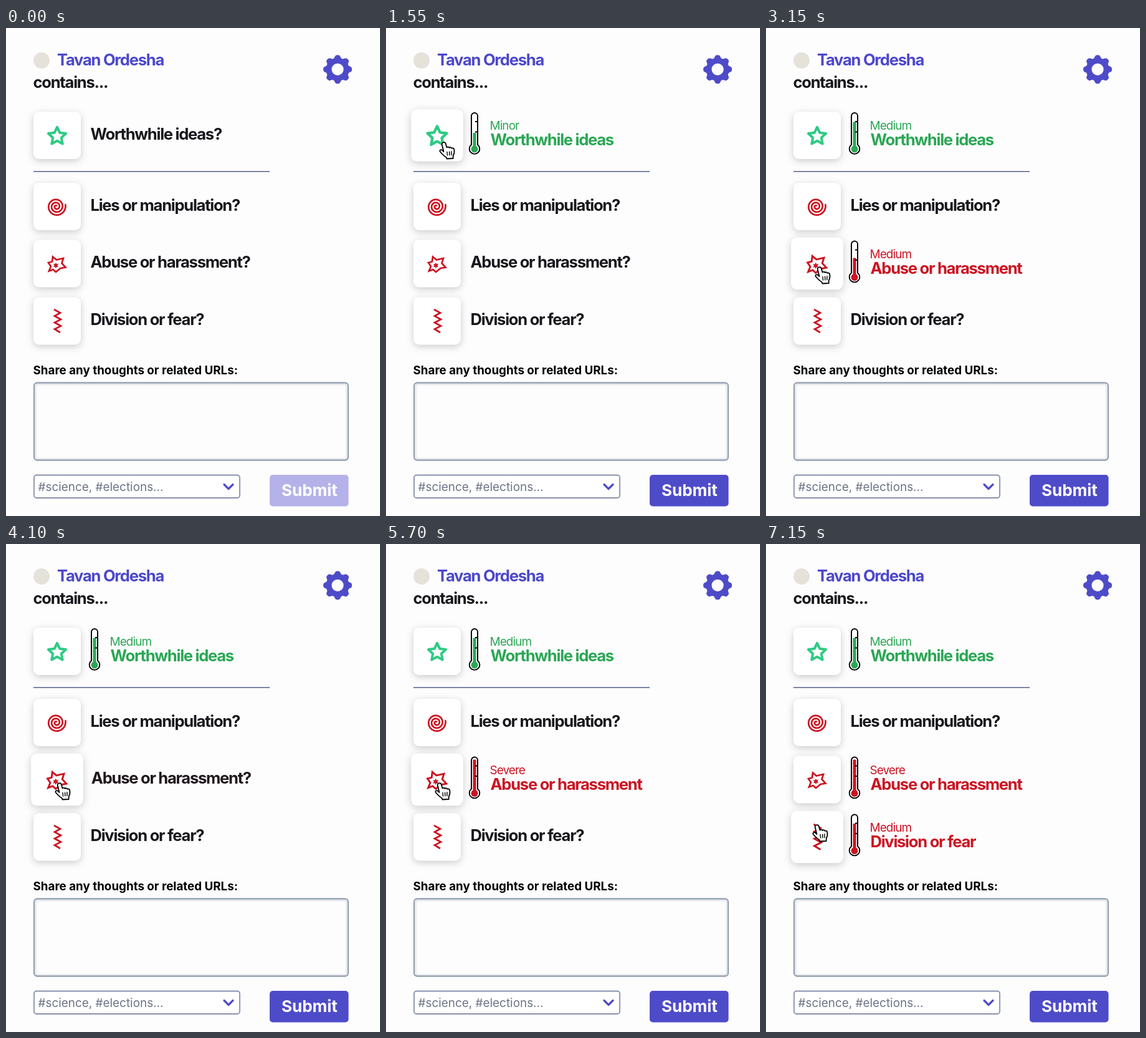
Write an HTML page that moves like this. It is 600 px wide and 782 px high and loops after 7.2 s.

```html
<!DOCTYPE html>
<html lang="en">
<head>
<meta charset="utf-8">
<title>Rating form</title>
<style>
  html, body { margin: 0; width: 100%; height: 100%; overflow: hidden; background: #fefdfe; }
  svg { display: block; width: 100%; height: 100%; }
  text { font-family: Inter, sans-serif; white-space: pre; }
  .big { font-size: 25.6px; font-weight: 700; letter-spacing: -.05em; }
  .sub { font-size: 19px; letter-spacing: -.05em; }
  .card { fill: #fff; filter: drop-shadow(0 3px 6px rgba(0, 0, 0, .2)); }
  .line { fill: none; stroke-width: 2.7; }
</style>
</head>
<body>
<svg id="stage" viewBox="0 0 600 782">
  <defs>
    <filter id="soft"><feGaussianBlur stdDeviation="1.6"/></filter>
  </defs>
  <circle cx="57" cy="52" r="13" fill="#e5e2da"/>
  <text class="big" x="82" y="60" fill="#4c48cb">Tavan Ordesha</text>
  <text class="big" x="43.5" y="96" fill="#17181c">contains...</text>
  <path id="gear" fill="#4e4bc9" fill-rule="evenodd"/>
  <path d="M44 230H423" stroke="#7d86a8" stroke-width="1.8"/>
  <g id="rows"></g>

  <text x="43.5" y="554.5" font-size="18.8" font-weight="700">Share any thoughts or related URLs:</text>
  <rect x="46.5" y="570" width="501" height="121.5" rx="4" fill="none" stroke="#cfd4dc" stroke-width="2.5" filter="url(#soft)"/>
  <rect x="45" y="568.5" width="504" height="124" rx="5" fill="none" stroke="#8b97a9" stroke-width="1.8"/>

  <rect x="45" y="716.5" width="330" height="36.5" rx="4" fill="#fff" stroke="#8891ae" stroke-width="1.8"/>
  <text x="51.5" y="742" font-size="18.9" fill="#6d7486">#science, #elections...</text>
  <path d="M350 731.5L357 738.5L364 731.5" fill="none" stroke="#4e4bc9" stroke-width="3.2" stroke-linecap="round" stroke-linejoin="round"/>
  <rect id="submit" x="423" y="716" width="126.5" height="50.5" rx="5"/>
  <text x="442" y="750" font-size="26" font-weight="700" fill="#fff">Submit</text>

  <g id="hand" stroke="#000" stroke-width="1.8" stroke-linejoin="round" stroke-linecap="round">
    <path fill="#fff" d="M-1.5 .5C.5 -.5 2.3 .6 2.7 2.3L4.6 8.6C5 7.3 8 7 8.6 9C9.5 7.8 12 8 12.4 9.8C13.5 9 16 9.6 16.2 11.8C16.8 15 16.8 18 14.8 21L14.6 26L4.5 26.5L3.5 24C0 22 -3 19 -6 15.5C-8 12.8 -4.5 11 -2.5 13.2L-.5 15L-3.2 4C-3.6 2 -3 1 -1.5 .5Z"/>
    <path fill="none" stroke-width="1.4" d="M5 15.5L5.6 21M8.6 15.2L8.9 20.8M12 14.8V20.5"/>
  </g>
</svg>
<script>
const LOOP = 7200;
const GREEN = [42, 167, 84], RED = [204, 20, 34], INK = [23, 24, 28];
const NAMES = ['', 'Minor', 'Medium', 'Severe'];
const FILL_TOP = [54, 34, 16.5, 6];   // fill height below the card's top edge
const $ = id => document.getElementById(id);

const clamp = v => Math.min(1, Math.max(0, v));
const smooth = p => p * p * (3 - 2 * p);
const easeOut = p => 1 - (1 - p) ** 3;
const mix = (a, b, p) => a + (b - a) * p;
const rgb = (a, b, p) => `rgb(${a.map((v, i) => Math.round(mix(v, b[i], p)))})`;

// Closed or open path through count points given in polar form
function polar(cx, cy, count, at, close = true) {
  const points = Array.from({ length: count }, (_, i) => {
    const [r, a] = at(i);
    return `${(cx + r * Math.cos(a)).toFixed(2)} ${(cy + r * Math.sin(a)).toFixed(2)}`;
  });
  return 'M' + points.join('L') + (close ? 'Z' : '');
}

const star = (cx, cy, tips, outer, inner) =>
  polar(cx, cy, tips * 2, i => [i % 2 ? inner : outer, i * Math.PI / tips - Math.PI / 2]);

// Icons are drawn around the centre of their card
const icons = {
  star: `<path d="${star(0, 1.6, 5, 14.8, 7.2)}" fill="none" stroke="#2fcb84" stroke-width="4" stroke-linejoin="round"/>`,
  spiral: `<path class="line" stroke="#cc1422" stroke-linecap="round" d="${
    polar(-1.3, .1, 90, i => [15 - 13.6 * i / 89, -.2 + i / 89 * 5.6 * Math.PI], false)}"/>`,
  burst: `<path class="line" stroke="#cc1422" d="M-7 -11L-1 -6L10 -8.500L7.500 -.5L13.500 6L5.500 7.500L-2 13.500L-6.500 9.500L-13 12L-10 4.500L-14 -1.500L-8 -3Z"/>
    <path d="${star(-2, 3, 6, 4.8, 2.5)}" fill="#cc1422"/>`,
  zigzag: `<path class="line" stroke="#cc1422" d="M-5 -18.5L5 -13L-4 -8L6 -2.5L-4 2.5L6 8L-4 13L5 18.5"/>`
};

// hover and level are lists of [time, new value]
const rows = [
  { y: 134, icon: 'star', text: 'Worthwhile ideas', tone: GREEN,
    hover: [[610, 1], [2120, 0]], level: [[1080, 1], [1680, 2]] },
  { y: 248, icon: 'spiral', text: 'Lies or manipulation', tone: RED,
    hover: [[2155, 1], [2225, 0]], level: [] },
  { y: 339.5, icon: 'burst', text: 'Abuse or harassment', tone: RED,
    hover: [[2250, 1], [6200, 0]],
    level: [[2700, 1], [3060, 2], [3400, 3], [3840, 0], [4375, 1], [4720, 2], [5060, 3]] },
  { y: 431.5, icon: 'zigzag', text: 'Division or fear', tone: RED,
    hover: [[6225, 1]], level: [[6550, 1], [6790, 2]] }
];

const path = [
  [300, -30, 260], [680, 93, 183], [2050, 93, 183], [2300, 105, 356],
  [2450, 86, 383], [6050, 86, 383], [6380, 82, 450], [LOOP, 82, 450]
];

// Value that eases toward the latest step from wherever it was
function follow(steps, t, duration, ease, initial = 0) {
  let from = initial, to = initial, start = 0;
  const at = time => mix(from, to, ease(clamp((time - start) / duration)));
  for (const [time, value] of steps) {
    if (time > t) break;
    from = at(time);
    to = value;
    start = time;
  }
  return at(t);
}

const levelAt = (row, t) => row.level.reduce((now, [time, v]) => time <= t ? v : now, 0);

function cursorAt(t) {
  const i = path.findIndex(k => k[0] > t);
  if (i < 1) return path[0].slice(1);
  const [t0, x0, y0] = path[i - 1], [t1, x1, y1] = path[i];
  const p = smooth((t - t0) / (t1 - t0));
  return [mix(x0, x1, p), mix(y0, y1, p)];
}

for (const row of rows) {
  const g = document.createElementNS('http://www.w3.org/2000/svg', 'g');
  const color = rgb(row.tone, row.tone, 0);
  g.setAttribute('transform', `translate(0 ${row.y})`);
  g.innerHTML = `
    <g class="tile"><rect class="card" x="-38" y="-38" width="76" height="76" rx="9"/>${icons[row.icon]}</g>
    <g class="meter">
      <path d="M137 53V7a5 5 0 0 1 10 0V53a8.3 8.3 0 1 1 -10 0Z" fill="#fff" stroke="#000" stroke-width="1.9"/>
      <circle cx="142" cy="60" r="5.5" fill="${color}"/>
      <rect class="fill" x="139.5" width="5" rx="1" fill="${color}"/>
      <path d="M143 16H147M143 32.5H147" stroke="#000" stroke-width="1.8"/>
    </g>
    <text class="sub" y="29" fill="${color}"></text>
    <text class="big"></text>`;
  for (const part of ['tile', 'meter', 'fill', 'sub', 'big']) row[part] = g.querySelector('.' + part);
  $('rows').append(g);
}

$('gear').setAttribute('d', polar(532, 66.3, 144, i => {
  const a = i * Math.PI / 72;
  return [20.6 + 2.5 * Math.tanh(1.5 * Math.cos(8 * a) + .3), a];
}) + 'M541.6 66.3a9.6 9.6 0 1 0 -19.2 0a9.6 9.6 0 1 0 19.2 0Z');

function drawRow(row, t) {
  const level = levelAt(row, t);
  const shown = follow(row.level.map(([time, v]) => [time, v ? 1 : 0]), t, 400, easeOut);
  const top = follow(row.level.map(([time, v]) => [time, FILL_TOP[v]]), t, 260, smooth, FILL_TOP[0]);
  const scale = 1 + .1 * follow(row.hover, t, 200, smooth);
  const x = 135.5 + 32 * shown;

  row.tile.setAttribute('transform', `translate(82 38) scale(${scale})`);
  row.meter.setAttribute('opacity', level ? shown : 0);
  row.fill.setAttribute('y', top);
  row.fill.setAttribute('height', 60 - top);
  row.sub.setAttribute('x', x - 1);
  row.sub.textContent = NAMES[level];
  row.big.setAttribute('x', x);
  row.big.setAttribute('y', level ? 54 : 44.5);
  row.big.setAttribute('fill', rgb(INK, row.tone, shown));
  row.big.textContent = row.text + (level ? '' : '?');
}

function draw(t) {
  rows.forEach(row => drawRow(row, t));
  const ready = follow([[rows[0].level[0][0], 1]], t, 150, smooth);
  $('submit').setAttribute('fill', rgb([181, 178, 234], [78, 75, 201], ready));
  $('hand').setAttribute('transform', `translate(${cursorAt(t)})`);
}

const began = performance.now();
function tick() {
  draw((performance.now() - began) % LOOP);
  requestAnimationFrame(tick);
}
tick();
</script>
</body>
</html>
```
